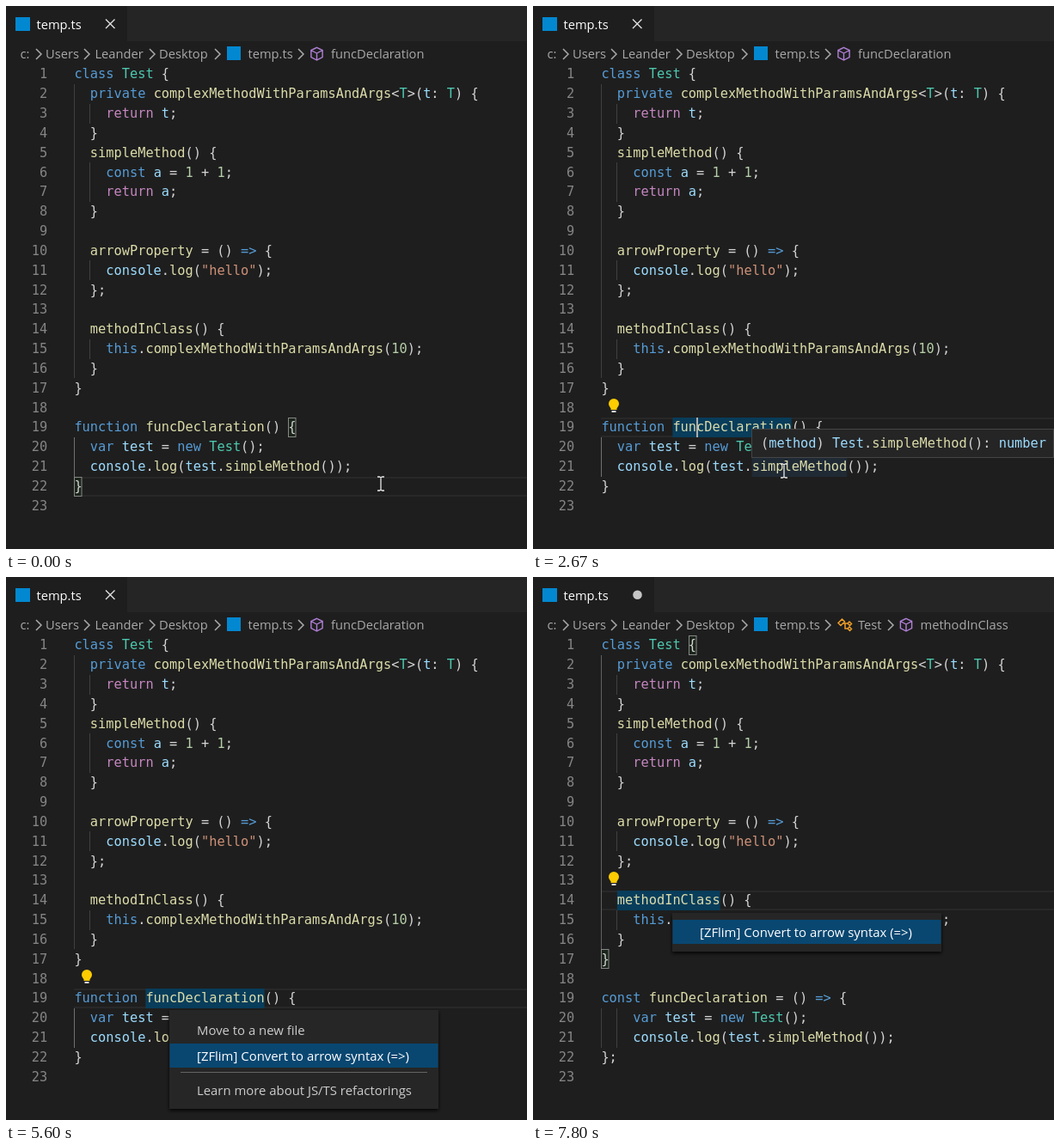
Animation of 606x632 px, one loop 8 s. Source, as an HTML page:

```html
<!DOCTYPE html>
<html lang="en">
<head>
<meta charset="utf-8">
<title>Convert to arrow syntax</title>
<style>
  html, body { margin: 0; width: 100%; height: 100%; overflow: hidden; background: #1e1e1e; }
  svg { display: block; width: 100%; height: 100%; }
  text { white-space: pre; }
  .code { font: 15.32px "DejaVu Sans Mono", "Noto Sans Mono", monospace; font-variant-ligatures: none; fill: #d4d4d4; }
  .ui { font: 14.7px "Open Sans", "Noto Sans", sans-serif; fill: #a9a9a9; }
  .menu { font-size: 14.9px; fill: #ccc; }
  .on { fill: #fff; }
  .num { fill: #858585; text-anchor: end; }
  .kw { fill: #569cd6; } .ctl { fill: #c586c0; } .type { fill: #4ec9b0; } .fn { fill: #dcdcaa; }
  .var { fill: #9cdcfe; } .lit { fill: #b5cea8; } .str { fill: #ce9178; }
  .line { fill: none; stroke: #a9a9a9; stroke-width: 1.2; }
</style>
</head>
<body>
<svg id="stage" viewBox="0 0 606 632" xmlns="http://www.w3.org/2000/svg"></svg>
<script>
const STEP = 1000 / 15, LOOP = 8000;
const CW = 9.22, LH = 22.83, X0 = 79.4, Y0 = 68.1, BASE = 16.3;
const colX = c => X0 + c * CW;
const lineY = n => Y0 + (n - 1) * LH;
const snap = n => Math.round(lineY(n));

const head = `class Test {
  private complexMethodWithParamsAndArgs<T>(t: T) {
    return t;
  }
  simpleMethod() {
    const a = 1 + 1;
    return a;
  }

  arrowProperty = () => {
    console.log("hello");
  };

  methodInClass() {
    this.complexMethodWithParamsAndArgs(10);
  }
}`.split("\n");
const before = `function funcDeclaration() {
  var test = new Test();
  console.log(test.simpleMethod());
}`.split("\n");
const after = `const funcDeclaration = () => {
    var test = new Test();
    console.log(test.simpleMethod());
};`.split("\n");

const rules = [
  ["str", /^"/], ["lit", /^\d/], ["ctl", /^return$/],
  ["kw", /^(class|private|const|function|var|new|this|=>)$/],
  ["var", /^(console|test|a|t|method|number|Test\.)$/],
  ["type", /^(Test|T)$/], ["fn", /^\w/]
];
const esc = s => s.replace(/&/g, "&amp;").replace(/</g, "&lt;").replace(/>/g, "&gt;");

function paint(src) {
  return src.replace(/"[^"]*"|=>|\w+|[^\w"]/g, (tok, at) => {
    const key = tok === "Test" && src[at + 4] === "." ? "Test." : tok;
    const rule = rules.find(r => r[1].test(key));
    return rule ? `<tspan class="${rule[0]}">${esc(tok)}</tspan>` : esc(tok);
  });
}
const codeAt = (x, y, src) => `<text class="code" x="${x}" y="${y}">${paint(src)}</text>`;
const block = (lines, first) => lines.map((s, i) => codeAt(X0, lineY(first + i) + BASE, s)).join("");
const ui = (x, y, s, cls = "") => `<text class="ui ${cls}" x="${x}" y="${y}">${esc(s)}</text>`;
const rect = (x, y, w, h, fill, more = "") =>
  `<rect x="${x}" y="${y}" width="${w}" height="${h}" fill="${fill}" ${more}/>`;
const group = (id, body) => `<g id="${id}">${body}</g>`;

const guide = (col, from, to, color = "#404040") =>
  rect(Math.floor(colX(col)), snap(from), 1, snap(to + 1) - snap(from), color);
const word = (line, col, len, fill) => rect(colX(col), snap(line), len * CW, 23, fill);
const bracket = (line, col) =>
  rect(Math.round(colX(col)) + .5, snap(line) + .5, 8.5, 22, "#1b251b", 'stroke="#888"');
const chevron = x => `<path class="line" style="stroke-width:1.5" d="M${x - 3} 50l6 6l-6 6"/>`;
const cube = x => `<path class="line" style="stroke:#b180d7;stroke-width:1.4"
  transform="translate(${x} 55.5)" d="M0 -7.2L6.6 -4V4L0 7.5L-6.6 4V-4ZM-6.6 -4L0 -.5L6.6 -4M0 -.5V7.5"/>`;
const classIcon = `<path class="line" style="stroke:#ee9d28;stroke-width:1.5"
  d="M355 53.5l4.5-4.5l3 3l-4.5 4.5zM361 54h5M363 54v6h3M366 54l2-2l2.5 2.5l-2 2zM366 60l2-2l2.5 2.5l-2 2z"/>`;
const action = "[ZFlim] Convert to arrow syntax (=>)";
const panel = (x, y, w, h) => rect(x, y, w, h, "#252526", 'filter="url(#shadow)"');

document.getElementById("stage").innerHTML = `
  <defs><filter id="shadow" x="-10%" y="-20%" width="120%" height="150%">
    <feDropShadow dx="0" dy="2" stdDeviation="2" flood-color="#000" flood-opacity=".9"/></filter></defs>
  ${rect(0, 0, 606, 632, "#1e1e1e")}
  ${rect(141, 0, 465, 41, "#252526")}
  ${rect(11, 13, 17, 16, "#0288d1")}${ui(35.5, 27, "temp.ts", "on")}
  ${group("close", '<path class="line" style="stroke:#e0e0e0;stroke-width:1.4" d="M116 15.5l10.5 10.5M126.5 15.5l-10.5 10.5"/>')}
  ${group("dirty", '<circle cx="121.5" cy="20.7" r="5.3" fill="#c5c5c5"/>')}
  ${ui(16.5, 61, "c:")}${ui(46, 61, "Users")}${ui(103.5, 61, "Leander")}${ui(178, 61, "Desktop")}
  ${[38, 94, 170, 246, 343].map(chevron).join("")}
  ${rect(257, 47, 16, 16, "#0288d1")}${ui(281.5, 61, "temp.ts")}
  ${group("crumbFn", cube(361.5) + ui(378, 61, "funcDeclaration"))}
  ${group("crumbMethod", classIcon + ui(378, 61, "Test") + chevron(416) + cube(434) + ui(450.5, 61, "methodInClass"))}
  ${group("current", rect(79, 0, 527, 2, "#282828") + rect(79, 21, 527, 2, "#282828"))}
  ${guide(0, 2, 16)}${[[3, 3], [6, 7], [11, 11], [15, 15]].map(g => guide(2, ...g)).join("")}
  ${guide(0, 20, 21)}
  ${group("guideAfter", guide(2, 20, 21))}
  ${group("guideFn", guide(0, 20, 21, "#707070"))}
  ${group("guideClass", guide(0, 2, 16, "#606060"))}
  ${group("guideMethod", guide(2, 15, 15, "#707070"))}
  ${group("pairFn", bracket(19, 27) + bracket(22, 0))}
  ${group("pairClass", bracket(1, 11) + bracket(17, 0))}
  ${group("pairMethod", bracket(14, 18) + bracket(16, 2))}
  ${group("wordFn", word(19, 9, 15, "#083d5b"))}
  ${group("wordMethod", word(14, 2, 13, "#083d5b"))}
  ${group("wordHover", word(21, 19, 12, "#202a35"))}
  ${Array.from({ length: 23 }, (_, i) => `<text class="code num" x="48.3" y="${lineY(i + 1) + BASE}">${i + 1}</text>`).join("")}
  ${block(head, 1)}
  ${group("before", block(before, 19))}
  ${group("after", block(after, 19))}
  ${group("bulb", `<circle cx="94" cy="7" r="6" fill="#fc0"/>
    <path d="M90.5 10h7v4h-7z" fill="#fc0"/><path d="M91.5 15h5v2h-5z" fill="#d8d8d8"/>`)}
  ${group("caret", rect(0, 0, 2, 23, "#aeafad"))}
  ${group("hover", rect(254.5, 492.5, 351, 33, "#252526", 'stroke="#454545"') +
    codeAt(265, 514, "(method) Test.simpleMethod(): number"))}
  ${group("menu", panel(190, 504, 313, 115) +
    `<rect id="pick" x="190.5" width="312" height="28" fill="#094771"/>` +
    ui(222, 533, "Move to a new file", "menu") + ui(222, 563, action, "menu") +
    rect(203, 576, 287, 1, "#646464") + ui(222, 603, "Learn more about JS/TS refactorings", "menu"))}
  ${group("menu2", panel(162, 391, 313, 45) + rect(162.5, 399, 312, 28, "#094771") + ui(194, 419, action, "menu on"))}
  ${group("mouse", `<path d="M-4 -8h2.5l1.5 1l1.5 -1h2.5M0 -7v14M-4 8h2.5l1.5 -1l1.5 1h2.5"
    fill="none" stroke="#e8e8e8" stroke-width="1.3"/>`)}
`;

const el = {};
document.querySelectorAll("[id]").forEach(e => el[e.id] = e);
const show = (id, on) => el[id].setAttribute("visibility", on ? "visible" : "hidden");
const move = (id, x, y) => el[id].setAttribute("transform", `translate(${x} ${y})`);

// step, x, y
const mousePath = [[0, 436, 556], [5, 192, 553], [10, 192, 553], [13, 164, 563], [15, 164, 563],
  [23, 192, 493], [25, 192, 493], [28, 354, 496], [34, 292, 541]];
// step, line, column, blink start
const caretPath = [[0, 22, 1, 0], [25, 19, 12, 25], [88, 19, 9, 88], [95, 18, 0, 95], [97, 17, 1, 97],
  [99, 16, 3, 99], [101, 15, 9, 101], [105, 14, 9, 104.5]];

function mouseAt(n) {
  const i = mousePath.findIndex(k => k[0] > n);
  if (i < 0) return mousePath[mousePath.length - 1].slice(1);
  const [a, b] = [mousePath[i - 1], mousePath[i]];
  const u = (n - a[0]) / (b[0] - a[0]), e = u * u * (3 - 2 * u);
  return [a[1] + (b[1] - a[1]) * e, a[2] + (b[2] - a[2]) * e];
}

function render(t) {
  const n = Math.floor(t / STEP + .06);
  const within = (a, b = 999) => n >= a && n < b;
  const [, line, col, start] = caretPath.filter(k => k[0] <= n).pop();

  move("mouse", ...mouseAt(n));
  show("mouse", n < 49);

  move("current", 0, snap(line));
  move("caret", Math.round(colX(col)), snap(line));
  const blinkOn = (n - start) * STEP % 1000 < 500;
  show("caret", within(87, 88) || n >= 25 && !within(69, 87) && n < 116 && blinkOn);

  const edited = n >= 88;
  show("before", !edited);
  show("after", edited);
  show("close", !edited);
  show("dirty", edited);
  show("guideAfter", edited);
  show("crumbFn", n < 102);
  show("crumbMethod", n >= 102);

  show("guideFn", line === 19 || line === 22);
  show("guideClass", line === 17 || line === 14);
  show("guideMethod", line === 15 || line === 16);
  show("pairFn", n < 25);
  show("pairClass", within(98, 100) || n >= 105);
  show("pairMethod", within(100, 105));

  show("wordFn", within(29, 88));
  show("wordMethod", n >= 108);
  show("bulb", within(29, 88) || n >= 108);
  move("bulb", 0, snap(n < 100 ? 18 : 13));

  show("wordHover", within(38, 49));
  show("hover", within(38, 49));
  el.hover.setAttribute("opacity", Math.min(1, (n - 37) / 3, Math.max(0, (50 - n) / 2)));

  show("menu", within(69, 87));
  el.pick.setAttribute("y", n < 84 ? 513 : 543);
  document.querySelectorAll("#menu .menu").forEach((item, i) =>
    item.classList.toggle("on", i === (n < 84 ? 0 : 1)));
  show("menu2", n >= 116);
}

const t0 = performance.now();
function tick() {
  render((performance.now() - t0) % LOOP);
  requestAnimationFrame(tick);
}
tick();
</script>
</body>
</html>
```
